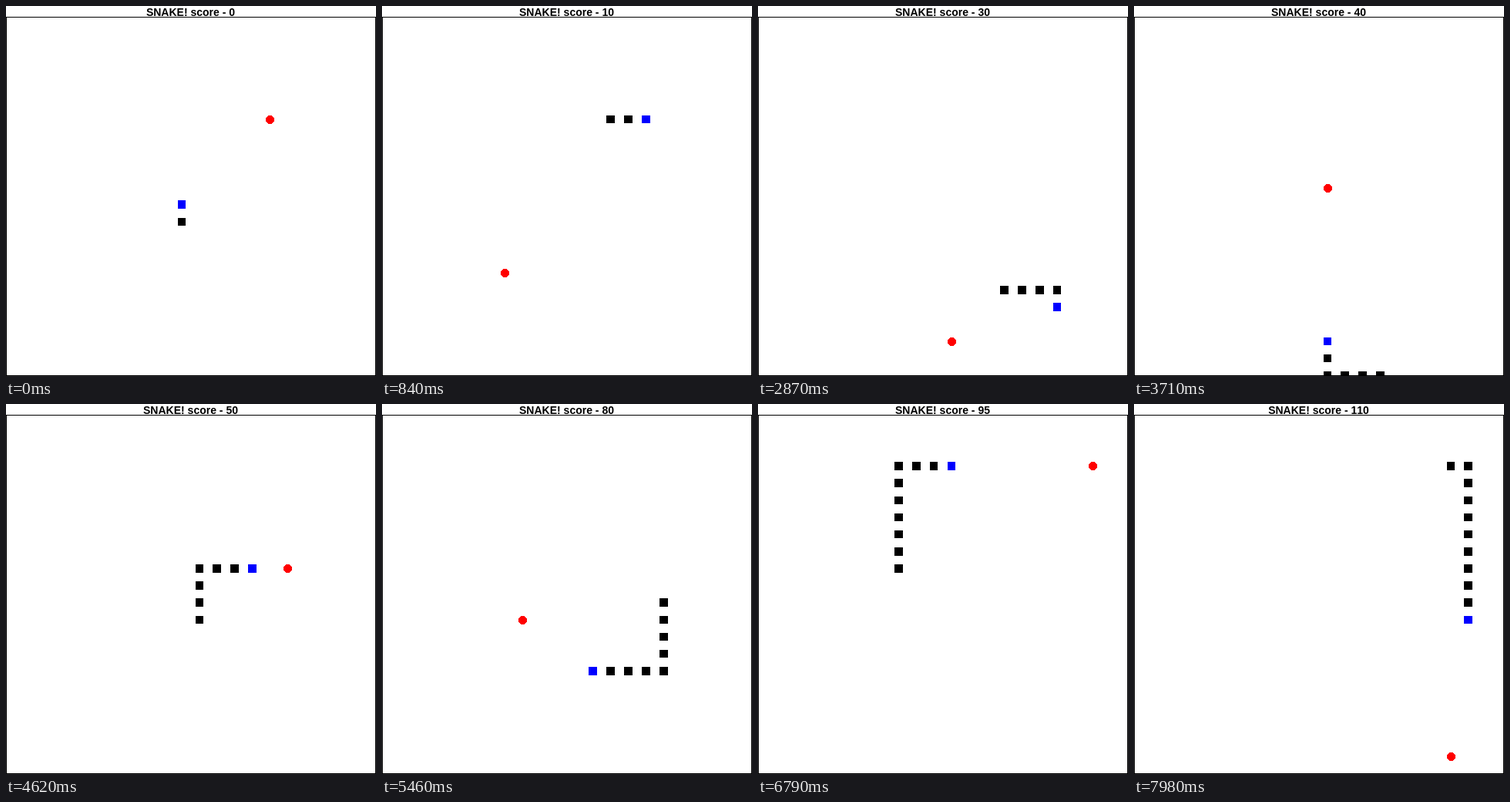
An HTML page for the animation above (8 s loop, 480 by 480 pixels).

```html
<!DOCTYPE html>
<html lang="en">
<head>
<meta charset="utf-8">
<title>Snake</title>
<style>
  html, body { margin: 0; width: 100%; height: 100%; overflow: hidden; background: #fff; }
  svg { display: block; width: 100%; height: 100%; }
  text { font: bold 14px "Liberation Sans", Arial, sans-serif; font-kerning: none; text-anchor: middle; }
</style>
</head>
<body>
<svg viewBox="0 0 480 480">
  <text id="title" x="239.5" y="13"></text>
  <g id="snake" shape-rendering="crispEdges"></g>
  <circle id="food" r="5.5" fill="#f00" shape-rendering="crispEdges"/>
  <rect x="0.5" y="14.5" width="479" height="465" fill="none" stroke="#000" shape-rendering="crispEdges"/>
</svg>
<script>
const STEP = 70, LOOP = 8000;
const ROUTE = 'U6 R2 D1 R3 D9 L8 D1 R10 D5 L6 U11 U1 R5 D6 L8 U12 R11 D9';
const FOODS = [[15, 6], [7, 15], [17, 16], [11, 19], [11, 10], [16, 9], [12, 15], [8, 12], [19, 3], [18, 20]];
const DIRS = { U: [0, -1], D: [0, 1], L: [-1, 0], R: [1, 0] };

const $ = id => document.getElementById(id);
const set = (el, attrs) => { for (const k in attrs) el.setAttribute(k, attrs[k]); };

// Cells visited by the head, starting with the first tail cell
const trail = [[10, 12], [10, 11]];
for (const run of ROUTE.split(' ')) {
  const [dx, dy] = DIRS[run[0]];
  for (let n = +run.slice(1); n > 0; n--) {
    const [x, y] = trail[trail.length - 1];
    trail.push([x + dx, y + dy]);
  }
}

// Number of pieces eaten after each step
let count = 0;
const eaten = trail.slice(1).map(([x, y]) => {
  const [fx, fy] = FOODS[count];
  if (x === fx && y === fy) count++;
  return count;
});

const cells = Array.from({ length: 2 + count }, () => {
  const cell = document.createElementNS('http://www.w3.org/2000/svg', 'rect');
  return $('snake').appendChild(cell);
});

const score = n => 10 * n + 5 * Math.max(0, n - 5);

function placeCell(el, [col, row], fill) {
  const cx = col * 160 / 7, cy = 14 + row * 465 / 21;
  const x = Math.floor(cx - 5.4), y = Math.floor(cy - 4.7);
  set(el, {
    x, y, fill,
    width: Math.floor(cx + 5.3) - x,
    height: Math.min(480, Math.floor(cy + 5.9)) - y,
    visibility: 'visible'
  });
}

function draw(step) {
  const n = eaten[step], [fx, fy] = FOODS[n];
  $('title').textContent = `SNAKE! score - ${score(n)}`;
  set($('food'), {
    cx: Math.floor(fx * 160 / 7 - 5.2) + 5.5,
    cy: Math.floor(9.525 + fy * 22.155) + 5.5
  });
  cells.forEach((el, i) => {
    if (i < n + 2) placeCell(el, trail[step + 1 - i], i ? '#000' : '#00f');
    else set(el, { visibility: 'hidden' });
  });
}

let start = null, shown = -1;
function tick(now) {
  if (start === null) start = now;
  const step = Math.min(eaten.length - 1, Math.floor((now - start) % LOOP / STEP));
  if (step !== shown) draw(shown = step);
  requestAnimationFrame(tick);
}
draw(0);
requestAnimationFrame(tick);
</script>
</body>
</html>
```
